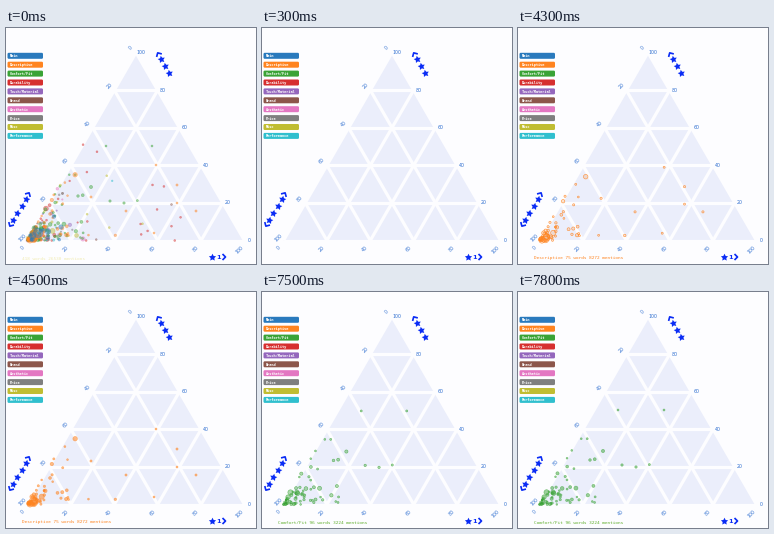
These frames come from a looping animation (250x236 px, 8 s). A matplotlib script:

```python
import numpy as np
import matplotlib.pyplot as plt
from matplotlib.animation import FuncAnimation
from matplotlib.patches import FancyBboxPatch, Polygon

W, H, DPI = 250, 236, 100
STEP, LOOP = 100, 8000
PX = 72 / DPI
LEFT, BASE, SIDE = 21.5, 212.5, 217
TALL = SIDE * np.sqrt(3) / 2
PAPER, PANEL, INK, STAR = "#fdfdff", "#ebeefb", "#2f6fd0", "#0a2cf5"
MONO = "DejaVu Sans Mono"

GROUPS = {
    "Main": "#2a7abd", "Descriptive": "#ff8420", "Comfort/Fit": "#3aa336",
    "Durability": "#d62f2f", "Touch/Material": "#9467bd", "Brand": "#8c564b",
    "Aesthetic": "#e377c2", "Price": "#7f7f7f", "Misc": "#c0bd32",
    "Performance": "#30bfce",
}

fig = plt.figure(figsize=(W / DPI, H / DPI), dpi=DPI, facecolor=PAPER)
ax = fig.add_axes([0, 0, 1, 1])
ax.set(xlim=(0, W), ylim=(H, 0))
ax.axis("off")


def place(a, c):
    """Ternary shares (top, right) to stage pixels."""
    return LEFT + SIDE * (c + a / 2), BASE - TALL * a


def label(x, y, text, size, color, **kw):
    return ax.text(x, y, text, fontsize=size * PX, color=color,
                   va="center_baseline", **kw)


def grid_line(p, q):
    ax.plot(*zip(p, q), color=PAPER, lw=3.2 * PX, zorder=1,
            solid_capstyle="butt")


def draw_grid():
    ax.add_patch(Polygon([place(0, 0), place(1, 0), place(0, 1)],
                         fc=PANEL, ec="none", zorder=0))
    for k in range(6):
        t = k / 5
        grid_line(place(t, 0), place(t, 1 - t))
        grid_line(place(0, t), place(1 - t, t))
        grid_line(place(0, t), place(t, 0))
        for (x, y), dx, dy, angle in ((place(t, 1 - t), 5, -0.5, 0),
                                      (place(1 - t, 0), -5, -6, 45),
                                      (place(0, t), -5, 6.5, 45)):
            label(x + dx, y + dy, str(20 * k), 4.8, INK, ha="center",
                  rotation=angle)


def chevron(x, y, dx, dy, size=2.4):
    """Arrow head at (x, y) pointing along (dx, dy)."""
    tails = [(x - size * (dx + s * dy), y - size * (dy - s * dx))
             for s in (-1, 1)]
    ax.plot(*zip(tails[0], (x, y), tails[1]), color=STAR, lw=1.7 * PX)


def star(x, y, angle=0):
    ax.plot(x, y, marker=(5, 1, angle), ms=7.6 * PX, mfc=STAR, mec="none")


def star_row(x, y, n, angle, ends):
    """Slanted row of stars centred on (x, y), chevrons at the given ends."""
    dx, dy = np.cos(np.radians(angle)), -np.sin(np.radians(angle))
    gap = 8.1
    for i in range(n):
        s = (i - (n - 1) / 2) * gap
        star(x + s * dx, y + s * dy, angle)
    for e in ends:
        s = e * (n + 0.75) / 2 * gap
        chevron(x + s * dx, y + s * dy, e * dx, e * dy)


def draw_titles():
    star_row(159.3, 38, 3, -60, (-1,))
    star_row(13.5, 181.5, 4, 60, (-1, 1))
    star(206.3, 229)
    label(212.5, 229, "1", 6.5, STAR, ha="center", weight="bold")
    chevron(219.5, 229, 1, 0)


def draw_legend():
    for i, (name, color) in enumerate(GROUPS.items()):
        y = 27.8 + 8.9 * i
        ax.add_patch(FancyBboxPatch(
            (2.5, y - 2), 33.5, 4, fc=color, ec="none",
            boxstyle="round,pad=1,rounding_size=1.3"))
        label(3.8, y, name, 3.65, "white", family=MONO, weight="bold")


class Words:
    """One group's words: a cloud thinning out from the lower left corner,
    plus a few strays over the whole triangle."""

    def __init__(self, name, seed, n, spread, strays=0, size=0.9, keys=()):
        rng = np.random.default_rng(seed)
        a, c = spread * rng.exponential(1, (2, n)) ** 1.25
        c *= rng.random(n) > 0.2
        u, v = np.sort(rng.random((2, strays)), axis=0)
        a = np.r_[np.minimum(a, 0.35), 0.6 * u * (rng.random(strays) > 0.2)]
        c = np.r_[np.minimum(c, 0.4), v - u]
        x, y = place(a, c)
        r = np.r_[size * (0.75 + rng.exponential(0.45, n)),
                  np.full(strays, 0.95)]
        if keys:
            kx, ky, kr = np.transpose(keys)
            x, y, r = np.r_[x, kx], np.r_[y, ky], np.r_[r, kr]
        self.home = np.c_[x, y]
        color = GROUPS[name]
        style = dict(s=(2 * r * PX) ** 2, zorder=3)
        self.fill = ax.scatter(x, y, c=color, lw=0, **style)
        self.ring = ax.scatter(x, y, fc="none", ec=color, lw=0.6 * PX,
                               **style)

    def show(self, reach, fill, ring):
        """Pose the cloud at a share of its full reach from the corner."""
        corner = np.array([LEFT, BASE])
        for art, alpha in ((self.fill, fill), (self.ring, ring)):
            art.set_offsets(corner + reach * (self.home - corner))
            art.set_alpha(alpha)
            art.set_visible(True)

    def hide(self):
        self.fill.set_visible(False)
        self.ring.set_visible(False)


draw_grid()
draw_titles()
draw_legend()

clouds = {
    "Durability": Words("Durability", 3, 16, 0.07, 18),
    "Touch/Material": Words("Touch/Material", 5, 18, 0.06),
    "Brand": Words("Brand", 6, 10, 0.06, 2),
    "Aesthetic": Words("Aesthetic", 7, 12, 0.06),
    "Price": Words("Price", 8, 22, 0.06),
    "Misc": Words("Misc", 10, 14, 0.07, 5),
    "Performance": Words("Performance", 11, 12, 0.06),
    "Comfort/Fit": Words(
        "Comfort/Fit", 9, 66, 0.065, size=1.1,
        keys=[(100, 118, 1), (146, 118, 1), (118, 175, 1.2),
              (104, 173, 1.2), (85, 159, 1.6), (72, 168, 1.3)]),
    "Descriptive": Words(
        "Descriptive", 4, 58, 0.045, size=1.2,
        keys=[(150, 137, 1), (171, 157, 1.1), (190, 183, 1.1),
              (171, 175, 1), (120, 183, 1.1), (85, 169, 1.1),
              (148, 205, 1)]),
    "Main": Words(
        "Main", 2, 8, 0.04, size=1.5,
        keys=[(32, 205, 4.7), (27, 207.5, 3), (42, 203.5, 2.8),
              (55, 199, 2.2), (48, 188.5, 1.8)]),
}

CAPTIONS = {
    "All": ("418 words 26530 mentions", "#f1ecb4"),
    "Main": ("Main 13 words 5193 mentions", GROUPS["Main"]),
    "Descriptive": ("Descriptive 75 words 8272 mentions",
                    GROUPS["Descriptive"]),
    "Comfort/Fit": ("Comfort/Fit 96 words 3224 mentions", "#5fae2c"),
    "": ("", PAPER),
}
caption = label(16, 230, "", 4.4, INK, family=MONO)

# start in ms, group, reach, fill alpha, ring alpha
SCENES = [
    (0, "All", 1, 0.45, 0.45),
    (300, "", 1, 0, 0),
    (1300, "Main", 0.97, 0.25, 0.8),
    (1500, "Main", 1, 0.5, 0.9),
    (4300, "Descriptive", 0.97, 0.2, 0.85),
    (4500, "Descriptive", 1, 0.55, 0.55),
    (7300, "Comfort/Fit", 0.97, 0.25, 0.85),
    (7500, "Comfort/Fit", 0.99, 0.4, 0.7),
    (7800, "Comfort/Fit", 1, 0.5, 0.6),
]


def update(frame):
    now = frame * STEP
    _, group, *pose = [s for s in SCENES if s[0] <= now][-1]
    for name, cloud in clouds.items():
        if group in ("All", name):
            cloud.show(*pose)
        else:
            cloud.hide()
    text, color = CAPTIONS[group]
    caption.set_text(text)
    caption.set_color(color)
    return [caption]


anim = FuncAnimation(fig, update, frames=LOOP // STEP, interval=STEP,
                     repeat=True, repeat_delay=0, blit=False)
plt.show()
```
